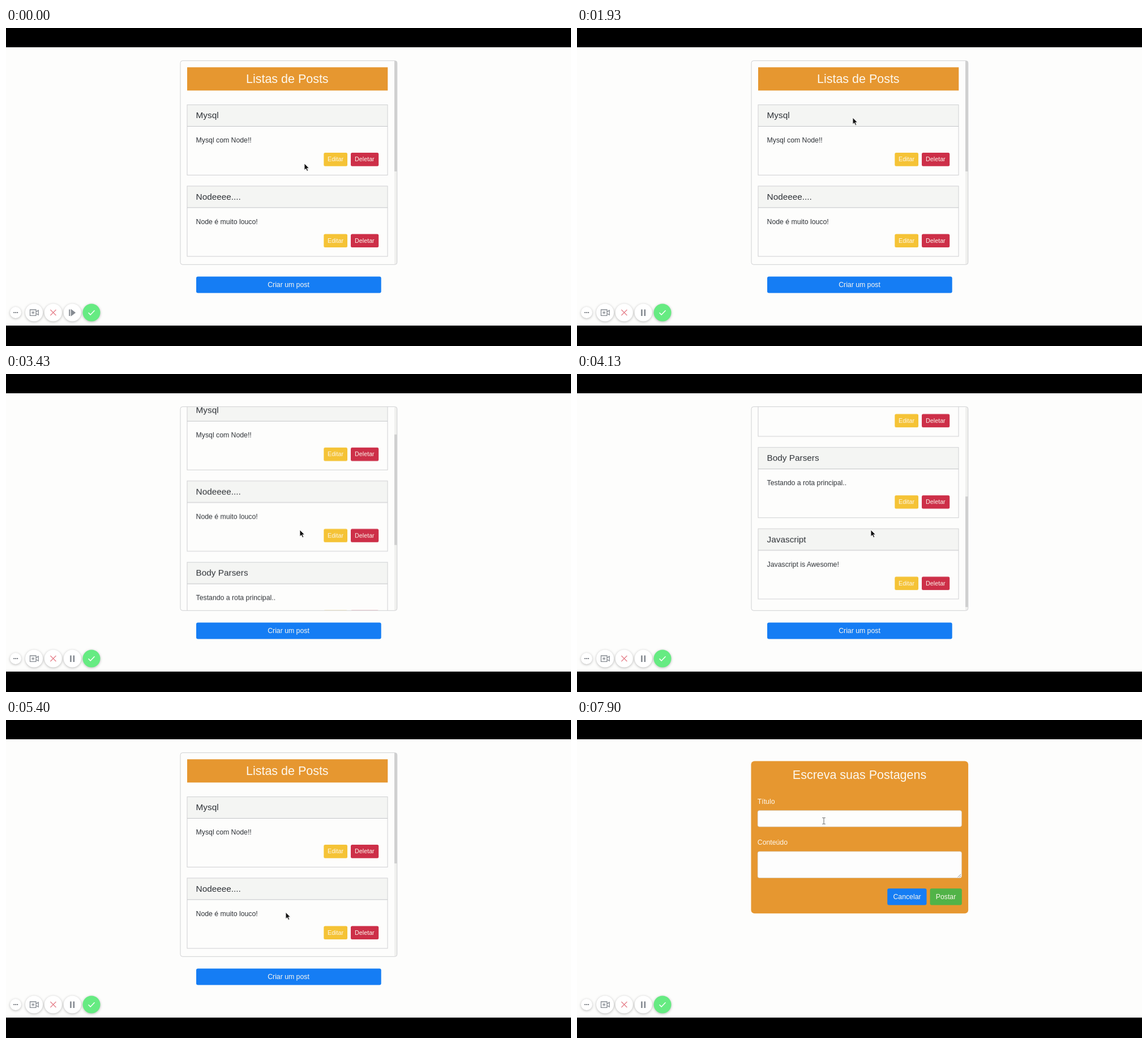
Recreate the animation shown at these times as an HTML page. Size 998 by 561 pixels, loop 8000 ms.

```html
<!DOCTYPE html>
<html lang="pt-BR">
<head>
<meta charset="utf-8">
<title>Listas de Posts</title>
<style>
  html, body { margin: 0; width: 100%; height: 100%; overflow: hidden; background: #000; }
  svg { display: block; width: 998px; height: 561px; font-family: "Liberation Sans", Arial, sans-serif; font-size: 12.27px; }
  .big { font-size: 21.47px; }
  .mid { font-size: 15.33px; }
  .small { font-size: 10.73px; }
  .ink { fill: #2f3338; }
  .light { fill: #fdf8ee; }
  .center { text-anchor: middle; }
  .line { fill: none; stroke: #cfd0d2; }
  .blue { fill: #157df4; }
  .icon { fill: none; stroke: #858a91; stroke-width: 1.3; }
  .disc { fill: #fff; filter: drop-shadow(0 1px 2px rgba(0, 0, 0, .28)); }

  .anim { animation: 8s linear infinite; }
  .step { animation: 8s step-end infinite; }

  .scroll { animation-name: scroll; }
  @keyframes scroll {
    0%, 39% { transform: translateY(0); }
    42.875% { transform: translateY(-90px); }
    51.625% { transform: translateY(-292.7px); }
    52.3%, 53.5% { transform: translateY(-304px); }
    61%, 100% { transform: translateY(0); }
  }
  .thumb { animation-name: thumb; }
  @keyframes thumb {
    0%, 39% { transform: translateY(0); }
    42.875% { transform: translateY(48.5px); }
    51.625% { transform: translateY(158px); }
    52.3%, 53.5% { transform: translateY(164px); }
    61%, 100% { transform: translateY(0); }
  }
  .pointer { animation-name: pointer; }
  @keyframes pointer {
    0%, .375% { transform: translate(527px, 239px); }
    10.375%, 11.25% { transform: translate(505px, 165px); }
    21.25% { transform: translate(476px, 160px); }
    24.125% { transform: translate(487px, 158px); }
    31% { transform: translate(514px, 250px); }
    34%, 53% { transform: translate(519px, 275px); }
    61% { transform: translate(506px, 308px); }
    67.5% { transform: translate(494px, 339px); }
    71% { transform: translate(495px, 398px); }
    73.5% { transform: translate(498px, 455px); }
    74.625%, 89.1% { transform: translate(498.5px, 463px); }
    91% { transform: translate(480px, 370px); }
    93.75%, 96.6% { transform: translate(436px, 207px); }
    98.75%, 100% { transform: translate(436px, 178px); }
  }
  .hover { animation-name: hover; }
  @keyframes hover {
    0%, 73% { fill: #157df4; }
    74.6%, 100% { fill: #0f6bd8; }
  }

  .list { animation-name: list; }
  @keyframes list { 0% { visibility: visible; } 80%, 100% { visibility: hidden; } }
  .form { animation-name: form; }
  @keyframes form { 0% { visibility: hidden; } 80%, 100% { visibility: visible; } }
  .tools { animation-name: tools; }
  @keyframes tools { 0% { opacity: 1; } 80% { opacity: 0; } 86.25%, 100% { opacity: 1; } }
  .resume { animation-name: resume; }
  @keyframes resume { 0% { opacity: 1; } .375%, 100% { opacity: 0; } }
  .pause { animation-name: pause; }
  @keyframes pause { 0% { opacity: 0; } .375%, 100% { opacity: 1; } }

  .arrow { animation-name: arrow; }
  @keyframes arrow { 0% { opacity: 1; } 73.6% { opacity: 0; } 89.1% { opacity: 1; } 97.4%, 100% { opacity: 0; } }
  .hand { animation-name: hand; }
  @keyframes hand { 0% { opacity: 0; } 73.6% { opacity: 1; } 89.1%, 100% { opacity: 0; } }
  .beam { animation-name: beam; }
  @keyframes beam { 0% { opacity: 0; } 97.4%, 100% { opacity: 1; } }
</style>
</head>
<body>
<svg viewBox="0 0 998 561">
  <defs>
    <clipPath id="view"><rect x="308" y="58" width="383" height="359" rx="4"/></clipPath>
    <g id="card">
      <rect x="320" y="135.5" width="354" height="38" fill="#f4f5f3"/>
      <rect class="line" x="320" y="135.5" width="354" height="124"/>
      <path class="line" d="M320 173.5h354" style="stroke:#c3c5c8"/>
      <rect x="561.3" y="220" width="41.7" height="23.7" rx="2.5" fill="#f5c336"/>
      <rect x="609" y="220" width="49.2" height="23.7" rx="2.5" fill="#cd2f48"/>
      <g class="small light center">
        <text x="582" y="235.3">Editar</text>
        <text x="633.4" y="235.3">Deletar</text>
      </g>
    </g>
  </defs>

  <rect y="34" width="998" height="491" fill="#fdfdfc"/>

  <g class="list step">
    <g clip-path="url(#view)">
      <g class="scroll anim">
        <rect x="320" y="69.3" width="354.3" height="41" fill="#e69730"/>
        <text class="big light center" x="496.8" y="97">Listas de Posts</text>
        <g class="ink">
          <use href="#card"/>
          <text class="mid" x="335.6" y="159.3">Mysql</text>
          <text x="335.6" y="202.3">Mysql com Node!!</text>
          <g transform="translate(0 143.4)">
            <use href="#card"/>
            <text class="mid" x="335.6" y="159.3">Nodeeee....</text>
            <text x="335.6" y="202.3">Node é muito louco!</text>
          </g>
          <g transform="translate(0 286.9)">
            <use href="#card"/>
            <text class="mid" x="335.6" y="159.3">Body Parsers</text>
            <text x="335.6" y="202.3">Testando a rota principal..</text>
          </g>
          <g transform="translate(0 430.4)">
            <use href="#card"/>
            <text class="mid" x="335.6" y="159.3">Javascript</text>
            <text x="335.6" y="202.3">Javascript is Awesome!</text>
          </g>
        </g>
      </g>
      <rect x="686" y="58" width="5" height="359" fill="#f0f0ee"/>
      <rect class="thumb anim" x="686" y="58" width="5" height="195" fill="#d0d0d0"/>
    </g>
    <rect class="line" x="308" y="57.7" width="382.8" height="359.6" rx="4"/>
    <rect class="blue hover anim" x="336" y="438.4" width="326.7" height="29.2" rx="3"/>
    <text class="light center" x="499" y="457">Criar um post</text>
  </g>

  <g class="form step">
    <rect x="307.5" y="72.4" width="383.6" height="268.8" rx="6" fill="#e69730"/>
    <g class="light">
      <text class="big center" x="499" y="104">Escreva suas Postagens</text>
      <text x="318.8" y="147.8">Título</text>
      <text x="318.8" y="220">Conteúdo</text>
    </g>
    <g fill="#fdfdfd" stroke="#d5d2cc" stroke-width=".7">
      <rect x="319.2" y="159.7" width="360.2" height="28.6" rx="3"/>
      <rect x="319.2" y="232" width="360.2" height="46.5" rx="3"/>
    </g>
    <path d="M672.5 277.5l5.5-5.5M675.5 277.5l2.5-2.5" stroke="#777" stroke-width=".8"/>
    <rect class="blue" x="548.2" y="297.2" width="69.3" height="29.3" rx="3"/>
    <rect x="623.5" y="297.2" width="56.3" height="29.3" rx="3" fill="#51b348"/>
    <g class="light center">
      <text x="583" y="316">Cancelar</text>
      <text x="651.5" y="316">Postar</text>
    </g>
  </g>

  <g class="tools step">
    <g class="disc">
      <circle cx="17" cy="502" r="10"/>
      <circle cx="49.5" cy="502" r="15.5"/>
      <circle cx="83.3" cy="502" r="15.5"/>
      <circle cx="117.2" cy="502" r="15.5"/>
      <circle cx="151" cy="502" r="15.5" fill="#66eb82"/>
    </g>
    <path d="M13.3 502h7.8" stroke="#6d7278" stroke-width="1.8" stroke-dasharray="1.8 1.2"/>
    <g class="icon">
      <path d="M42.5 497h10.5v10.3h-10.5zM53 500.6l4.2-2.4v8l-4.2-2.4M47.7 499.5v5.2M45.1 502.1h5.2"/>
      <path d="M78.4 497l10 10M88.4 497l-10 10" stroke="#e5808b"/>
      <path class="pause step" d="M114.4 496.5v11.5M119.8 496.5v11.5" stroke-width="2.6"/>
      <g class="resume step">
        <path d="M112.2 496.5v11.5" stroke-width="2"/>
        <path d="M115.2 497l6.8 5.2-6.8 5.2z" fill="#858a91"/>
      </g>
      <path d="M145.5 502.3l3.6 3.6 7.4-7.6" stroke="#fff" stroke-width="1.5"/>
    </g>
  </g>

  <g class="pointer anim">
    <path class="arrow step" d="M0 0v11.6l2.7-2.4 2 4.2 2-1-2-4h3.7z" fill="#111" stroke="#fff" stroke-width=".8"/>
    <path class="hand step" d="M-1.4 7.5V1q0-1.3 1.2-1.3T1 1v4q1.2-.8 2.3.3 1.3-.5 2.2.6 1.8-.3 1.8 1.3v2.3q0 2-1.2 3.2v1H-.8q-.5-1.4-2-3.2-1.3-1.6-1.8-2.8 .2-1.6 1.7-.9z" fill="#fff" stroke="#333" stroke-width=".9"/>
    <path class="beam step" d="M-2.7-5.5h2q.7 0 .7.7v9.6q0 .7-.7.7h-2M2.7-5.5h-2Q0-5.5 0-4.8M0 4.8q0 .7.7.7h2" fill="none" stroke="#555" stroke-width=".9"/>
  </g>

  <path d="M0 0h998v34H0zM0 525.3h998V561H0z"/>
</svg>
</body>
</html>
```
